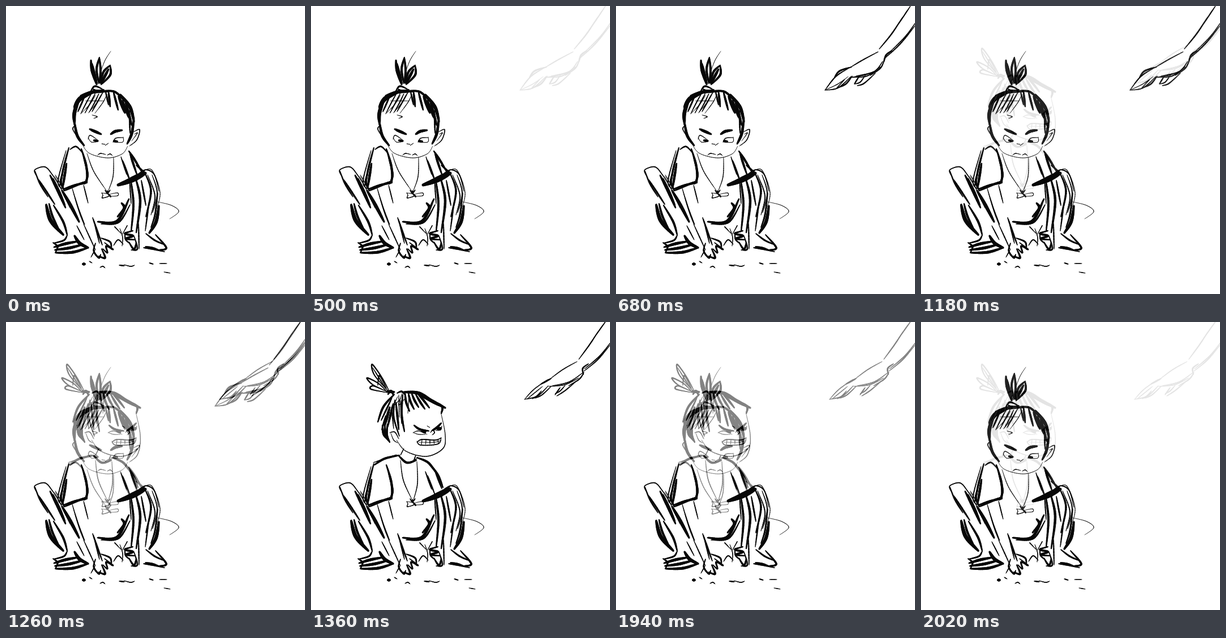
Animation of 528x510 px, one loop 2.04 s. Source, as an HTML page with a canvas:

```html
<!DOCTYPE html>
<html lang="en">
<head>
<meta charset="utf-8">
<title>Sketch</title>
<style>
html, body { margin: 0; width: 100%; height: 100%; overflow: hidden; background: #fff; }
canvas { display: block; }
</style>
</head>
<body>
<canvas id="stage" width="528" height="510"></canvas>
<script>
const W = 528, H = 510, LOOP = 2040, STEP = 20;
const stage = document.getElementById('stage').getContext('2d');
let g;

// Catmull-Rom value between b and c.
const curve = (a, b, c, d, u) =>
  b + u * (c - a + u * (2 * a - 5 * b + 4 * c - d + u * (3 * (b - c) + d - a))) / 2;

// Tapered brush stroke through x, y pairs.
function ink(size, ...xy) {
  const spans = xy.length / 2 - 1, count = spans * 10;
  const at = (i, k) => xy[2 * Math.max(0, Math.min(spans, i)) + k];
  const point = n => {
    const i = Math.min(spans - 1, Math.floor(n / 10)), u = n / 10 - i;
    return [0, 1].map(k => curve(at(i - 1, k), at(i, k), at(i + 1, k), at(i + 2, k), u));
  };
  for (let n = 0; n < count; n++) {
    g.lineWidth = size * (0.5 + 0.5 * Math.sin(Math.PI * (n + 0.5) / count));
    g.beginPath();
    g.moveTo(...point(n));
    g.lineTo(...point(n + 1));
    g.stroke();
  }
}

// Several strokes blending from one shape to another.
function hatch(count, size, from, to) {
  for (let i = 0; i < count; i++)
    ink(size, ...from.map((v, k) => v + (to[k] - v) * i / (count - 1)));
}

function legs() {
  ink(1.8, 53, 300, 51, 290, 69, 285, 82, 299, 91, 313);
  ink(2.6, 51, 292, 60, 315, 74, 338);
  ink(3.4, 58, 308, 86, 351);
  ink(4, 84, 353, 101, 382, 108, 405);
  hatch(2, 5, [78, 300, 92, 328, 105, 357], [83, 306, 94, 330, 104, 353]);
  ink(1.2, 86, 301, 100, 330, 113, 358);
  ink(6, 99, 327, 114, 353, 129, 382);
  ink(7, 71, 352, 79, 380, 101, 405);
  ink(4, 76, 350, 82, 372, 94, 397);
  ink(2, 125, 389, 138, 414);
  ink(3, 108, 406, 102, 415, 84, 420);
  hatch(3, 5, [85, 427, 105, 421, 126, 417], [88, 437, 118, 436, 145, 428]);
  ink(6, 121, 407, 130, 420, 145, 428);
  ink(3, 83, 419, 91, 426, 87, 437);

  ink(2, 235, 296, 248, 290, 262, 299, 270, 328);
  ink(1.2, 243, 292, 258, 291, 272, 330, 265, 362);
  ink(3.5, 246, 297, 256, 328, 247, 373);
  hatch(2, 2, [250, 299, 263, 336, 256, 370], [258, 299, 267, 331, 259, 366]);
  ink(2.5, 253, 345, 246, 398);
  ink(6, 270, 354, 265, 382, 253, 402);
  ink(3, 268, 331, 263, 370, 256, 392);
  ink(3, 247, 403, 263, 415, 281, 423);
  ink(3.5, 264, 405, 283, 428, 270, 432);
  hatch(2, 3, [243, 428, 257, 430, 280, 435], [246, 426, 258, 428, 270, 432]);
}

function shirt() {
  ink(3.5, 111, 251, 102, 285, 95, 318);
  ink(2, 106, 256, 92, 309, 99, 324);
  ink(4.5, 107, 279, 100, 322);
  ink(4, 100, 296, 97, 312, 103, 327);
  ink(1.3, 87, 299, 98, 318);
  hatch(2, 4, [102, 324, 123, 317, 143, 313], [103, 327, 123, 318, 140, 311]);
  ink(4, 133, 253, 142, 284, 143, 313);
  ink(4, 137, 267, 144, 298, 139, 315);
  ink(9, 198, 317, 225, 307, 246, 296);
  ink(6, 211, 311, 242, 300);
  ink(4, 203, 314, 244, 293);
  ink(5, 162, 382, 196, 381, 217, 342);
  ink(3, 168, 386, 199, 383, 219, 352);
  ink(5, 204, 349, 209, 358, 197, 373);
}

function arms() {
  hatch(2, 2, [117, 323, 127, 356, 139, 387], [122, 340, 130, 366, 138, 387]);
  ink(2, 137, 386, 158, 432);
  ink(2, 137, 317, 145, 349);
  ink(3, 153, 375, 170, 423);
  ink(2.4, 155, 379, 165, 420);
  ink(3, 168, 411, 184, 418, 186, 431);
  ink(3, 158, 420, 155, 434, 164, 446, 167, 440);
  ink(3.5, 164, 443, 175, 446, 169, 430);
  ink(3, 171, 430, 179, 437, 177, 425, 189, 431, 174, 419);
  ink(1.6, 157, 432, 150, 445);
  ink(2.2, 218, 306, 221, 350);
  ink(4, 220, 306, 225, 350, 221, 399);
  ink(4.5, 229, 305, 237, 345, 230, 401);
  ink(3, 239, 309, 247, 353);
  ink(2.4, 234, 385, 235, 430);
  ink(4, 224, 398, 210, 403, 224, 407, 212, 412, 227, 414);
  ink(3.5, 217, 418, 226, 431, 230, 419);
  ink(2.6, 226, 407, 232, 430, 221, 432);
  ink(2.5, 210, 401, 211, 413, 219, 421);
}

function yard() {
  ink(1.5, 205, 425, 206, 410, 201, 394);
  ink(1.3, 203, 403, 192, 391, 203, 402);
  ink(1.3, 206, 403, 214, 389, 206, 404);
  ink(2, 190, 424, 198, 414, 207, 422);
  ink(1, 264, 346, 292, 353, 305, 364, 289, 377);
  ink(5, 136, 457, 139, 457);
  ink(1.5, 147, 452, 152, 455);
  ink(1.6, 166, 463, 171, 461, 175, 464);
  ink(2.2, 200, 459, 209, 460);
  ink(1.6, 208, 458, 220, 461, 227, 459);
  ink(2, 253, 455, 260, 457);
  ink(1.6, 271, 456, 284, 456);
  ink(1.4, 279, 471, 290, 473);
}

function downHair() {
  ink(5, 160, 139, 152, 115, 150, 96);
  ink(4, 161, 138, 152, 102);
  hatch(2, 4, [164, 137, 160, 112, 165, 91], [165, 136, 167, 114, 165, 92]);
  hatch(2, 4, [167, 137, 172, 117, 184, 105], [168, 139, 184, 122, 184, 106]);
  ink(5, 168, 137, 181, 112);
  ink(.9, 185, 80, 175, 96, 167, 117);
  ink(3, 150, 150, 157, 142, 170, 147);
  ink(3, 153, 147, 161, 150, 173, 148);
  ink(8, 121, 179, 131, 164, 152, 153);
  ink(6, 132, 159, 155, 152, 180, 151);
  hatch(2, 4, [123, 174, 119, 195, 124, 222], [129, 168, 122, 190, 122, 206]);
  ink(5, 121, 206, 126, 230, 138, 247);
  ink(4, 166, 151, 192, 152, 212, 171);
  ink(6, 202, 157, 219, 179, 226, 205);
  ink(5, 211, 170, 222, 211);
  ink(5, 226, 198, 222, 226, 214, 244);
  ink(3, 218, 185, 219, 225);
  hatch(3, 2, [151, 155, 142, 171, 132, 191], [164, 155, 157, 170, 147, 188]);
  ink(2.4, 171, 153, 152, 187);
  hatch(3, 1.2, [158, 158, 148, 174, 134, 189], [178, 157, 171, 171, 157, 190]);
  ink(1.2, 152, 193, 161, 196, 155, 199);
  hatch(2, 4, [181, 152, 184, 178], [190, 153, 198, 184]);
  ink(3, 176, 152, 181, 175);
  ink(6, 199, 160, 210, 189);
  ink(4, 206, 167, 216, 197);
  ink(1, 140, 168, 173, 168);
  ink(3, 139, 160, 127, 187);
}

function downFace() {
  ink(1.6, 123, 211, 118, 218, 128, 235);
  ink(1.6, 225, 223, 236, 219, 231, 237, 218, 248);
  ink(1.2, 227, 227, 232, 225, 222, 239);
  ink(1, 132, 239, 146, 260, 179, 269, 205, 262, 215, 248);
  ink(5, 148, 218, 168, 227);
  ink(3, 151, 221, 166, 226);
  ink(5, 185, 227, 193, 222, 205, 220);
  ink(1.3, 145, 236, 149, 229, 164, 239);
  ink(1, 145, 233, 151, 241, 163, 240);
  ink(4, 155, 238, 162, 239);
  ink(1.4, 189, 241, 194, 234, 207, 233);
  ink(1, 207, 232, 206, 241, 189, 241);
  ink(4, 190, 239, 197, 240);
  ink(1, 169, 244, 175, 245);
  ink(1, 175, 247, 181, 243);
  ink(1.3, 162, 264, 167, 261, 176, 263);
  ink(1.3, 179, 264, 184, 262, 188, 265);
}

// Necklace pendant hanging at height y.
function pendant(y) {
  ink(2.2, 175, y - 9, 179, y - 4, 184, y - 9);
  ink(2, 179, y - 8, 180, y - 2);
  ink(1.3, 169, y - 4, 180, y - 2, 181, y + 2, 170, y + 5, 171, y, 169, y - 4);
  ink(1.1, 184, y - 2, 197, y - 4, 197, y + 1, 184, y + 2);
  ink(3, 181, y - 2, 185, y + 3);
}

function downTorso() {
  ink(2.5, 113, 254, 124, 249, 136, 261);
  ink(1.4, 143, 261, 155, 293, 178, 328);
  ink(1.4, 190, 268, 189, 302, 180, 329);
  pendant(335);
  hatch(2, 4, [217, 257, 227, 272, 240, 294], [219, 261, 224, 277, 231, 298]);
  ink(2.2, 203, 267, 213, 298);
  ink(3.5, 206, 274, 218, 307);
  ink(3, 230, 282, 245, 295);
}

function upHair() {
  ink(2.4, 137, 123, 112, 94, 108, 75, 125, 98, 138, 122);
  ink(2, 132, 118, 109, 81);
  ink(2.4, 136, 124, 109, 111, 99, 99, 118, 108, 132, 121);
  ink(2.4, 118, 112, 121, 95, 133, 117);
  ink(2.4, 135, 125, 106, 119, 109, 113, 125, 119);
  ink(5, 134, 123, 147, 124);
  ink(4, 136, 128, 141, 122, 146, 130);
  ink(4, 147, 128, 128, 150, 118, 177);
  ink(3, 152, 126, 160, 123, 166, 129);
  ink(3, 143, 134, 124, 174);
  ink(6, 164, 124, 190, 126, 213, 139);
  ink(6, 190, 125, 212, 139, 237, 152);
  ink(4, 211, 139, 231, 149, 230, 162);
  ink(3, 187, 127, 225, 148);
  ink(5, 139, 151, 130, 184);
  ink(4, 145, 145, 135, 187);
  ink(3, 132, 166, 125, 191);
  hatch(3, 4, [126, 183, 128, 198, 134, 207], [135, 181, 134, 200, 139, 213]);
  ink(3, 148, 138, 146, 168, 156, 202);
  ink(4, 150, 143, 155, 190);
  ink(2, 142, 151, 146, 189);
  hatch(2, 1.4, [153, 132, 147, 147, 159, 135], [161, 126, 155, 147, 168, 133]);
  ink(1.6, 155, 129, 156, 169);
  ink(4, 162, 129, 160, 162, 165, 194);
  ink(2, 158, 139, 160, 180);
  hatch(3, 4, [166, 126, 168, 142, 174, 158], [178, 127, 183, 139, 190, 151]);
  hatch(2, 4, [185, 128, 193, 142, 201, 154], [190, 129, 199, 139, 209, 152]);
  ink(1.2, 173, 132, 171, 162);
}

function upFace() {
  ink(1.6, 139, 196, 148, 195, 155, 207);
  ink(1.2, 141, 197, 146, 209, 153, 214);
  ink(1.6, 151, 209, 168, 229, 204, 238, 233, 224, 237, 200, 230, 163);
  ink(4, 182, 183, 192, 190, 208, 193);
  ink(4, 214, 192, 222, 187, 230, 179);
  ink(1.2, 180, 196, 190, 193, 205, 199);
  ink(5, 196, 193, 202, 195);
  ink(1, 181, 196, 190, 199, 202, 199);
  ink(5, 223, 189, 229, 188);
  ink(1.2, 220, 192, 229, 191, 231, 184);
  ink(1.6, 211, 196, 215, 191, 218, 196, 214, 200);
  ink(1, 205, 184, 210, 187);
  ink(2, 187, 213, 196, 208, 220, 209, 230, 205);
  ink(1.8, 230, 205, 224, 216, 194, 218, 187, 211);
  ink(1, 190, 213, 217, 213, 229, 210);
  hatch(5, 1.1, [196, 209, 195, 217], [224, 208, 225, 215]);
}

function upTorso() {
  ink(1.6, 164, 224, 158, 236);
  ink(1.8, 185, 236, 181, 247);
  ink(4, 112, 253, 130, 242, 156, 236);
  ink(2, 110, 249, 151, 235);
  ink(4, 155, 237, 169, 249, 186, 245);
  ink(2.4, 158, 239, 171, 249, 187, 242);
  ink(4, 187, 240, 207, 249, 222, 268);
  ink(4, 204, 246, 223, 269, 233, 293);
  ink(3, 219, 264, 231, 295);
  hatch(2, 2.5, [202, 265, 213, 296], [206, 272, 219, 306]);
  ink(1.6, 158, 245, 163, 280, 178, 314);
  ink(1.6, 187, 247, 188, 286, 181, 315);
  pendant(322);
}

function reach() {
  ink(2, 520, 0, 510, 15, 499, 32);
  ink(2.4, 506, 20, 487, 49, 465, 76);
  ink(2, 530, 28, 511, 54, 483, 82);
  ink(2.2, 528, 35, 502, 67, 473, 94);
  ink(3, 487, 79, 477, 87, 473, 99);
  ink(2, 463, 81, 435, 96, 415, 108);
  ink(3, 416, 108, 395, 115, 386, 126);
  ink(2.2, 411, 110, 388, 125, 369, 149);
  ink(2, 369, 149, 392, 145, 415, 125);
  ink(1.3, 371, 148, 392, 138, 410, 125);
  ink(2.6, 391, 145, 406, 138, 417, 124);
  ink(1.6, 389, 146, 404, 130);
  hatch(2, 2, [413, 127, 439, 122, 457, 116], [415, 126, 443, 124, 467, 108]);
  ink(2, 424, 124, 456, 116, 471, 98);
  ink(2.4, 429, 125, 421, 138);
  ink(2, 421, 138, 431, 135, 440, 123);
  ink(2.2, 426, 141, 438, 137, 458, 119);
  ink(2.2, 449, 123, 467, 110, 474, 95);
}

function recoil() {
  ink(2, 521, -2, 511, 12, 499, 29);
  ink(2.2, 507, 17, 492, 40, 473, 66);
  hatch(2, 2, [530, 35, 510, 60, 483, 83], [528, 41, 506, 67, 482, 87]);
  ink(2.6, 490, 74, 480, 82, 481, 93);
  ink(1.7, 470, 70, 445, 84, 422, 101);
  ink(3, 424, 100, 406, 110);
  ink(1.6, 418, 102, 394, 119, 377, 137);
  ink(2, 377, 137, 400, 131, 419, 113);
  ink(1.6, 382, 136, 409, 114);
  hatch(2, 2, [391, 136, 400, 130, 407, 122], [395, 135, 408, 129, 424, 114]);
  hatch(2, 1.8, [420, 114, 448, 111, 473, 99], [426, 113, 456, 106, 481, 89]);
  ink(2.2, 440, 116, 431, 129);
  ink(1.8, 431, 127, 440, 122, 449, 112);
  ink(2, 434, 131, 448, 122, 465, 108);
  ink(2.2, 455, 113, 474, 101, 482, 89);
}

function layer(parts, paper) {
  const c = document.createElement('canvas');
  c.width = W;
  c.height = H;
  g = c.getContext('2d');
  if (paper) {
    g.fillStyle = '#fff';
    g.fillRect(0, 0, W, H);
  }
  g.strokeStyle = '#080808';
  g.lineCap = 'round';
  parts.forEach(part => part());
  return c;
}

const down = [downHair, downFace, downTorso];
const body = layer([legs, shirt, arms, yard]);
const alone = layer(down, true);
const offered = layer([...down, reach], true);
const angry = layer([upHair, upFace, upTorso, recoil], true);

// Ten even steps, the first one visible at the start time.
const fade = (t, start) =>
  Math.max(0, Math.min(1, (Math.floor((t - start) / STEP) + 1) / 10));

function put(image, alpha) {
  stage.globalAlpha = alpha;
  stage.drawImage(image, 0, 0);
}

let begin;
function draw(now) {
  begin ??= now;
  const t = (now - begin) % LOOP;
  put(alone, 1);
  put(offered, t < 1860 ? fade(t, 500) : 0);
  put(angry, fade(t, 1180) - fade(t, 1860));
  put(body, 1);
  requestAnimationFrame(draw);
}
requestAnimationFrame(draw);
</script>
</body>
</html>
```
